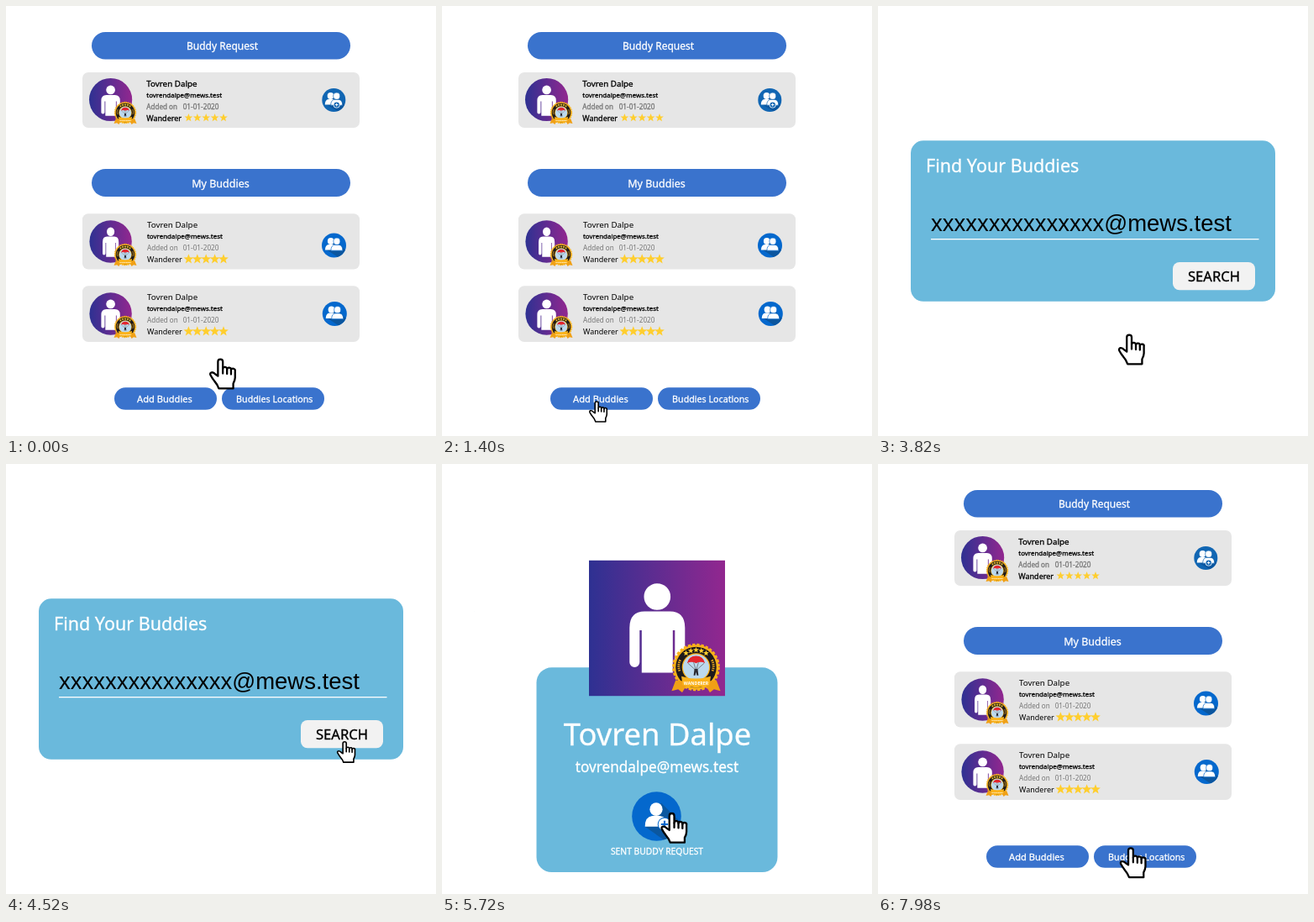
Write an HTML page that moves like this. It is 512x512 px and loops after 8 s.

```html
<!DOCTYPE html>
<html lang="en">
<head>
<meta charset="utf-8">
<title>Buddy request</title>
<style>
  html, body { margin: 0; width: 100%; height: 100%; overflow: hidden; background: #fff; }
  svg { display: block; width: 100%; height: 100%; }
  text { font-family: "Noto Sans", "Open Sans", sans-serif; white-space: pre; }
  .sans { font-family: "Liberation Sans", Arial, sans-serif; }
  .mid { text-anchor: middle; }
  .med { stroke: currentColor; stroke-width: .3px; }
</style>
</head>
<body>
<svg id="stage" viewBox="0 0 512 512">
  <defs>
    <linearGradient id="violet">
      <stop offset="0" stop-color="#2e3192"/>
      <stop offset="1" stop-color="#92278f"/>
    </linearGradient>
    <path id="star" d="M0-1 .25-.34.95-.31.4.13.59.81 0 .42-.59.81-.4.13-.95-.31-.25-.34Z"/>
    <!-- standing figure, x centred on 0, top of head at 0 -->
    <g id="person" fill="#fff">
      <circle cy="16" r="15.8"/>
      <path d="M-33 53Q-33 33.5-15 33.5H15Q33 33.5 33 53V94a6 6 0 0 1-12 0V56H18.5V106.5H-18.5V56H-21V94a6 6 0 0 1-12 0Z"/>
    </g>
    <!-- head and shoulders, centred on the neck -->
    <g id="bust">
      <circle cy="-8" r="8"/>
      <path d="M-14 13Q-14 1-5 0H5Q14 1 14 13Z"/>
    </g>
    <g id="badge"></g>
  </defs>
  <g id="list"></g>
  <g id="search"></g>
  <g id="profile"></g>
  <g id="hand" fill="#fff" stroke="#000" stroke-width="2.3" stroke-linejoin="round" stroke-linecap="round">
    <path d="M10.5 21V4a2.9 2.9 0 0 1 5.8 0V12.5a2.5 2.5 0 0 1 5 .6a2.4 2.4 0 0 1 4.8.9a2.4 2.4 0 0 1 4.8 1.2V23q0 3-2.2 7v5.8H11.5q-1.5-4.5-5-8.5q-3-3.8-5-7.6q-.8-2.6 1.6-3q2.4-.2 4.4 2.2Z"/>
    <path fill="none" d="M16.3 12.5V18M21.3 13.1V18.5M26.1 14V19"/>
  </g>
</svg>
<script>
const $ = id => document.getElementById(id);
const BLUE = '#3a73cd', SKY = '#6ab9dc', DEEP = '#0468cd', GOLD = '#ffce2e';
const NAME = 'Tovren Dalpe', MAIL = 'tovrendalpe@mews.test';
const TYPED = 'x'.repeat(15) + '@mews.test';
const LOOP = 8000;

const text = (s, x, y, size, color, cls = '') =>
  `<text x="${x}" y="${y}" font-size="${size}" fill="${color}" color="${color}" class="${cls}">${s}</text>`;
const rect = (x, y, w, h, r, fill, extra = '') =>
  `<rect x="${x}" y="${y}" width="${w}" height="${h}" rx="${r}" fill="${fill}" ${extra}/>`;
const disc = (x, y, r, fill, extra = '') =>
  `<circle cx="${x}" cy="${y}" r="${r}" fill="${fill}" ${extra}/>`;
const use = (id, x, y, sx, sy = sx, extra = '') =>
  `<use href="#${id}" transform="translate(${x} ${y}) scale(${sx} ${sy})" ${extra}/>`;

function badge() {
  let s = disc(0, 0, 27.5, '#f9b21a', 'stroke="#f9b21a" stroke-width="3.4" stroke-dasharray="3.4 2"')
    + disc(0, 0, 25, '#1d1a1c') + disc(0, 0, 17.3, '#f9b21a') + disc(0, 0, 16, '#bcd9ee');
  for (let i = -2; i <= 2; i++) {
    const a = i * 0.31;
    s += use('star', 21.2 * Math.sin(a), -21.2 * Math.cos(a), 3.7, 3.7, `fill="${GOLD}"`);
  }
  for (const k of [-1, 1])
    s += `<path d="M${k * 19.5}-9Q${k * 23}-2 ${k * 20} 5" fill="none" stroke="#e9a51c" stroke-width="3" stroke-dasharray="1.5 1"/>`;
  s += '<path d="M-11-5Q-9-14 0-14T11-5Q6-8 0-5Q-6-8-11-5Z" fill="#e3262e"/>'
    + '<path d="M-10-5 0 4 10-5M-3-6 0 4 3-6" fill="none" stroke="#555" stroke-width=".7"/>'
    + '<path d="M-2 2H2L3 10H1L0 6-1 10H-3Z" fill="#2b2b35"/>'
    + '<path d="M-16 17-25 16-30 29-22 27-17 31-12 23ZM16 17 25 16 30 29 22 27 17 31 12 23Z" fill="#f0a016"/>'
    + '<path d="M-18 11Q0 17 18 11L16.5 22Q0 28-16.5 22Z" fill="#fbb31c"/>'
    + '<text y="21.3" font-size="5.4" font-weight="700" fill="#fff" class="mid">WANDERER</text>';
  return s;
}

function stars(y, r) {
  let s = '';
  for (let i = 0; i < 5; i++) s += use('star', 217.4 + i * 10.4, y, r, r, `fill="${GOLD}"`);
  return s;
}

function friends(x, y, r, gear) {
  const fill = gear ? '#1166b3' : DEEP;
  let s = disc(x, y, r, fill)
    + `<path d="M${x + 3} ${y - 6}L${x + r * .92} ${y + r * .38}A${r} ${r} 0 0 1 ${x + r * .3} ${y + r * .95}L${x - 9} ${y + 5}Z" fill="#0b569f"/>`
    + use('bust', x - 3.8, y - 1, .48, .5, 'fill="#fff"')
    + use('bust', x + 3.4, y - .6, .5, .52, `fill="#fff" stroke="${fill}" stroke-width="1.4"`);
  if (gear) s += disc(x + 3.4, y + 5.6, 4, '#fff') + disc(x + 3.4, y + 5.6, 3.2, fill)
    + `<path d="M${x + 1.6} ${y + 5.6}h3.6m-1.8-1.8v3.6" stroke="#fff"/>`;
  return s;
}

function card(y, h, avatarY, figure, first) {
  const cls = first ? 'med' : '', base = y + (first ? 17 : 16.8), x = first ? 167.3 : 168;
  return rect(91, y, 330, h, 7, '#e6e6e6')
    + disc(124.6, avatarY, first ? 25.6 : 25.2, 'url(#violet)')
    + use('person', 124.6, avatarY - 17, ...figure)
    + use('badge', 142, avatarY + 15.5, .45)
    + text(NAME, x, base, 9.8, '#000', cls)
    + text(MAIL, x, base + 13, 7.95, '#000', 'med')
    + text('Added on', x, base + 27, 8.1, '#777', cls)
    + text('01-01-2020', 210.7, base + 27, 8.2, '#777', cls)
    + text('Wanderer', x, base + 41, 9, '#000', cls)
    + stars(y + 54.2, first ? 5.1 : 6.2);
}

$('badge').innerHTML = badge();

$('list').innerHTML =
  rect(102, 31, 308, 32.5, 16.2, BLUE) + text('Buddy Request', 257.5, 51.6, 12, '#fff', 'mid med')
  + card(79, 66, 111.5, [.34], true) + friends(390.3, 112, 14, true)
  + rect(102, 194, 308, 33, 16.5, BLUE) + text('My Buddies', 255.5, 216, 12.5, '#fff', 'mid med')
  + card(247.2, 66.3, 280.5, [.29, .33]) + friends(390.5, 285, 14.5)
  + card(333.2, 66.8, 366.5, [.34]) + friends(391.3, 366.5, 14.5)
  + rect(129, 454.3, 122, 26.5, 13.2, BLUE) + text('Add Buddies', 189, 471.5, 11.1, '#fff', 'mid med')
  + rect(257, 454.3, 122, 26.5, 13.2, BLUE) + text('Buddies Locations', 319.8, 471.5, 10.7, '#fff', 'mid med');

$('search').innerHTML =
  rect(39, 160.3, 434, 191.5, 15, SKY)
  + text('Find Your Buddies', 57, 197.8, 21.5, '#fff', 'med')
  + '<text id="typed" x="63" y="268" font-size="27.5" class="sans"></text>'
  + rect(63, 277, 390.5, 1.3, 0, '#fff')
  + rect(351, 305, 98, 33.3, 8, '#f2f2f2')
  + text('SEARCH', 400, 328, 16.6, '#000', 'mid med');

$('profile').innerHTML =
  rect(112.5, 242.3, 287, 243.7, 18, SKY)
  + rect(175, 114.8, 162, 161.4, 0, 'url(#violet)')
  + use('person', 256.3, 142, 1)
  + use('badge', 302.5, 242, .97)
  + text(NAME, 256.5, 335, 36.4, '#fff', 'mid med')
  + text(MAIL, 256, 367, 17.2, '#fff', 'mid med')
  + disc(255.5, 419.5, 29.3, DEEP)
  + '<path d="M261 403.5 284 426.5A29.3 29.3 0 0 1 264 447.5L242 432Z" fill="#0b579f"/>'
  + use('bust', 255, 419, .95, .98, 'fill="#fff"')
  + disc(265, 429, 8.3, DEEP) + disc(265, 429, 7.3, '#fff')
  + `<path d="M260.8 429h8.4m-4.2-4.2v8.4" stroke="${DEEP}" stroke-width="2.2"/>`
  + text('SENT BUDDY REQUEST', 256, 465, 10.3, '#fff', 'mid med')
  + '<g id="toast">' + rect(176, 373.4, 164, 27.6, 13.8, '#fff', 'fill-opacity=".4"')
  + text('Buddy Request Send', 257.5, 393, 15.75, '#58595b', 'mid sans') + '</g>';

const smooth = u => u * u * (3 - 2 * u);
const easeOut = u => u * (2 - u);
const clamp = u => Math.min(1, Math.max(0, u));

// start, length, target x, target y, easing
const moves = [
  [0, 1100, 170, 464.5, easeOut],
  [3520, 580, 389, 324.5, smooth],
  [5080, 820, 242.3, 427.5, smooth],
  [7720, 400, 305, 467.5, smooth]
];
const clicks = [1180, 4260, 6060], CLICK = 460;

function drawHand(t) {
  let x = 242, y = 419.5;
  for (const [start, len, tx, ty, ease] of moves) {
    const p = ease(clamp((t - start) / len));
    x += (tx - x) * p;
    y += (ty - y) * p;
  }
  let s = 1;
  for (const c of clicks) s -= .31 * Math.sin(Math.PI * clamp((t - c) / CLICK)) ** 2;
  $('hand').setAttribute('transform', `translate(${x + 16} ${y + 18.5}) scale(${s}) translate(-16 -18.5)`);
}

function draw(t) {
  const page = t < 1780 || t >= 7720 ? 'list' : t < 4820 ? 'search' : 'profile';
  for (const id of ['list', 'search', 'profile']) $(id).style.display = id === page ? '' : 'none';
  $('toast').style.display = t >= 6660 ? '' : 'none';
  const typed = Math.floor((t - 2130) / 48.8) + 1;
  $('typed').textContent = TYPED.slice(0, Math.max(0, typed));
  drawHand(t);
}

const begin = performance.now();
function tick() {
  draw((performance.now() - begin) % LOOP);
  requestAnimationFrame(tick);
}
tick();
</script>
</body>
</html>
```
